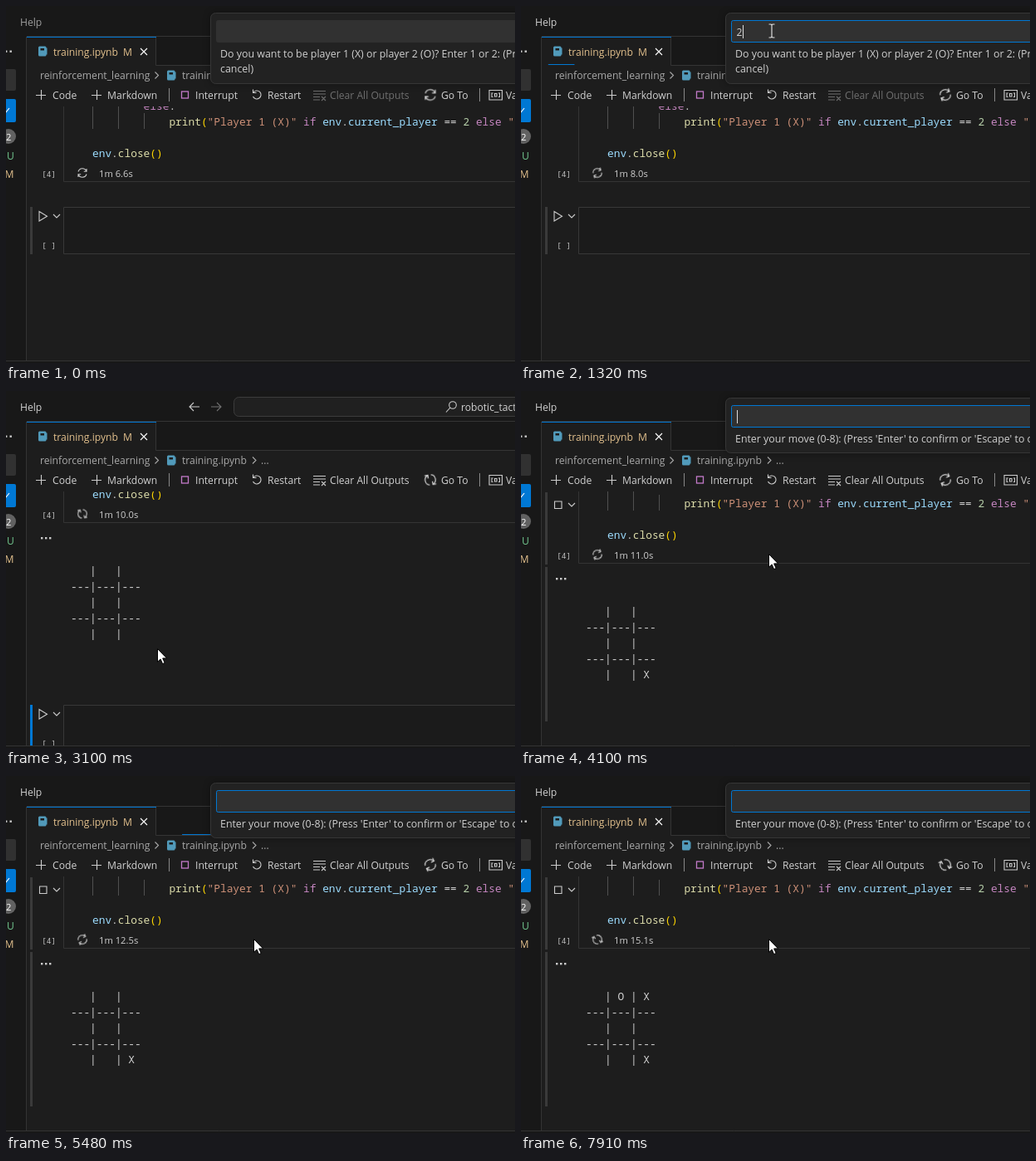
Animation of 613 by 430 pixels, one loop 7.99 s. Source, as an HTML page:

```html
<!DOCTYPE html>
<html lang="en">
<head>
<meta charset="utf-8">
<title>Notebook game</title>
<style>
  html, body { margin: 0; width: 100%; height: 100%; overflow: hidden; background: #1d1d1d; }
  svg { display: block; }
  text { font: 12.15px "Open Sans", "Noto Sans", sans-serif; fill: #d0d0d0; white-space: pre; }
  .mono { font: 12.83px "Noto Sans Mono", monospace; fill: #d4d4d4; }
  .tiny { font: 9.6px "Noto Sans Mono", monospace; fill: #bbb; }
  .time { font-size: 11.2px; }
  .ask { font-size: 12.4px; }
  .crumb { fill: #a9a9a9; }
  .mod { fill: #e2c08d; }
  .line { fill: none; stroke: #ccc; stroke-width: 1.1; }
  .edge { fill: none; stroke: #343434; }
  .guide { fill: none; stroke: #505050; }
  .fn { fill: #dcdcaa; } .par { fill: #ffd700; } .str { fill: #ce9178; }
  .key { fill: #c586c0; } .var { fill: #9cdcfe; } .num { fill: #b5cea8; }
  #prompt { filter: drop-shadow(0 0 4px rgba(0, 0, 0, .36)); }

  .spin { animation: spin 7990ms linear infinite; }
  @keyframes spin { to { transform: rotate(2062deg); } }

  #progress { transform-box: fill-box; transform-origin: center; animation: progress 7990ms linear infinite; }
  @keyframes progress {
    0%, 16.28% { transform: translateX(1519px); }
    16.29% { transform: none; }
    39.52% { transform: translateX(775px) scaleX(3); }
    62.75% { transform: translateX(1519px); }
    62.76% { transform: none; }
    85.98%, 100% { transform: translateX(775px) scaleX(3); }
  }

  #mouse { animation: mouse 7990ms linear infinite; }
  @keyframes mouse {
    0%, 4.38% { transform: translate(556px, 431px); }
    9.4%, 21.3% { transform: translate(302px, 30px); animation-timing-function: ease-in-out; }
    27.5% { transform: translate(212px, 340px); animation-timing-function: ease-in-out; }
    32.5%, 42.6% { transform: translate(182px, 310px); animation-timing-function: ease-in-out; }
    47.6%, 100% { transform: translate(298px, 196px); }
  }
</style>
</head>
<body>
<svg id="stage" width="613" height="430" viewBox="0 0 613 430"></svg>
<script>
const LOOP = 7990;
const BLINK = 0.465;
// Moments in seconds
const FOCUS = 0.78, TYPE_SIDE = 1.1, SEND_SIDE = 1.6, OUTPUT = 2, BOARD = 2.5;
const CLICK = 3.35, FIRST_X = 3.7, ASK_MOVE = 3.75, TYPE_MOVE = 6, SEND_MOVE = 7.1;

// y is the vertical middle of the line of text
const text = (x, y, s, cls = '', extra = '') =>
  `<text x="${x}" y="${y + 4.5}" class="${cls}" ${extra}>${s}</text>`;
const span = (cls, s) => `<tspan class="${cls}">${s}</tspan>`;
const rect = (x, y, w, h, fill, extra = '') =>
  `<rect x="${x}" y="${y}" width="${w}" height="${h}" fill="${fill}" ${extra}/>`;
const line = (d, extra = '') => `<path class="line" d="${d}" ${extra}/>`;
const edge = (d, cls = 'edge') => `<path class="${cls}" d="${d}"/>`;
const at = (x, y, body) => `<g transform="translate(${x} ${y})">${body}</g>`;

const plus = x => line(`M${x - 6} 107.5H${x + 6}M${x + 0.5} 101V113`);
const chevron = (x, y) => line(`M${x - 2} ${y - 4}l4 4-4 4`, 'style="stroke:#a9a9a9"');
const fold = (x, y) => line(`M${x - 4} ${y - 2}l4 4 4-4`);
const dots = (x, y) => [0, 5, 10].map(d => rect(x + d, y, 2.4, 2.4, '#ccc')).join('');
const book = (x, y) => rect(x, y - 6, 9.5, 12, '#519aba', 'rx="1.5"') +
  rect(x + 2.5, y - 3.5, 4.5, 2.5, '#1d1d1d') + rect(x + 9, y - 4, 1.5, 8, '#519aba');
const sync = (x, y, scale) => at(x, y, `<g class="spin"><g transform="scale(${scale})">` +
  line('M-5-1.5A5.2 5.2 0 0 1 4.8-2M5-5V-1.8H1.8M5 1.5A5.2 5.2 0 0 1-4.8 2M-5 5V1.8H-1.8') + '</g></g>');

const titleBar = rect(0, 0, 613, 37, '#181818') +
  text(-2.5, 19, 'l') + text(17, 19, 'Help', '', 'id="help"') +
  `<g id="header">
    ${line('M233 19H221M226 14l-5 5 5 5')}
    <g opacity=".5">${line('M247 19H259M254 14l5 5-5 5')}</g>
    ${rect(274.5, 7.5, 400, 23, '#202020', 'rx="6" stroke="#3c3c3c"')}
    <circle class="line" cx="538" cy="17" r="4.3"/>${line('M535 20l-5 5.5')}
    ${text(548, 19, 'robotic_tactoe')}
  </g>`;

const sideBar = rect(0, 37, 25, 393, '#181818') + edge('M24.5 37V427') +
  rect(-1, 53.5, 2.4, 2.4, '#ccc') + rect(4.5, 53.5, 2.4, 2.4, '#ccc') +
  rect(-5, 76, 17, 26, '#313131', 'rx="2"') + rect(-5, 112, 17, 28, '#0078d4', 'rx="2"') +
  line('M-3 127l2 2 5-6', 'style="stroke:#fff"') +
  '<circle cx="3" cy="157" r="9" fill="#616161"/>' + text(0, 157, '2', 'time', 'style="fill:#fff"') +
  text(1, 180, 'U', '', 'style="fill:#73c991"') + text(-1.5, 202, 'M', 'mod');

const tabs = rect(25, 37, 588, 34, '#181818') + rect(25, 37, 156, 35, '#1d1d1d') +
  edge('M25 36.5H613M180.5 37V71.5H613') + rect(25, 37, 156, 1, '#0078d4') +
  book(39, 54.5) + text(57, 55, 'training.ipynb', 'mod') + text(141, 55, 'M', 'mod') +
  line('M162 51l8 8M170 51l-8 8', 'style="stroke:#fff"') +
  text(41, 83.5, 'reinforcement_learning', 'crumb') + chevron(181.5, 83.5) + book(194, 83.5) +
  text(212, 83.5, 'training.ipynb', 'crumb') + chevron(299, 83.5) + text(307, 83.5, '...', 'crumb');

const toolBar = plus(42) + text(56, 107, 'Code') + plus(109) + text(122, 107, 'Markdown') +
  rect(196, 99, 1, 16, '#888') +
  '<rect x="211.5" y="103" width="8" height="8" fill="none" stroke="#c37ac9" stroke-width="1.3"/>' +
  text(228, 107, 'Interrupt') +
  line('M298 104A5 5 0 1 1 297.5 109M297.5 100.5V104.5H301.5') + text(315, 107, 'Restart') +
  `<g id="clear">${line('M370 102.5H385M370 106H385M370 109.5H378M370 113H378M380 109l5 5M385 109l-5 5')}
  ${text(390, 107, 'Clear All Outputs')}</g>` +
  sync(511, 107, 1.2) + text(524, 107, 'Go To') + rect(570, 99, 1, 16, '#888') +
  line('M582 101.5H597.5V113H582Z') + line('M586.5 105H585V109.5H586.5M593 105H594.5V109.5H593M588.5 105.5v3.5h2.5v-3.5z') +
  text(602, 107, 'Variables');

const printLine = span('fn', 'print') + span('par', '(') + span('str', '"Player 1 (X)"') +
  span('key', ' if ') + span('var', 'env') + '.' + span('var', 'current_player') + ' == ' +
  span('num', '2') + span('key', ' else ') + span('str', '"');
const closeLine = span('var', 'env') + '.' + span('fn', 'close') + span('par', '()');

const codeCell = `<g id="cell">
  ${edge('M69.5-80V34.5H613')}
  ${edge('M104.5-80V-29M135.5-80V-29M166.5-48V-29', 'guide')}
  ${text(165.6, -57, span('key', 'else') + ':', 'mono')}
  ${text(196.4, -38, printLine, 'mono')}
  ${text(104, 0, closeLine, 'mono')}
  ${text(43, 24, '[4]', 'tiny')} ${sync(92, 24, 1)}
  ${text(112, 24.5, '', 'time', 'id="time"')}
  <g id="cellBars">${rect(29, -51, 3, 87, 'inherit')}${rect(29, 39, 3, 186, 'inherit')}</g>
  <g id="more">${dots(42, 52)}</g>
  <g id="board">${[0, 1, 2, 3, 4].map(i => text(78, 92.5 + i * 19, '', 'mono')).join('')}</g>
</g>`;

const emptyCell = `<g id="nextCell">
  <path d="M613 .5H69.5V56.5H613" fill="#1b1b1b" stroke="#383838"/>
  ${rect(29, 0, 3, 57, 'inherit', 'id="nextBar"')}
  ${line('M40 5.5V17L49.5 11.2Z')} ${fold(61, 11)} ${text(43, 45.5, '[ ]', 'tiny')}
</g>`;

const prompt = `<g id="prompt">
  ${rect(246.5, 8.5, 420, 85, '#222', 'id="promptBox" rx="6" stroke="#363636"')}
  ${rect(253.5, 17.5, 420, 26, '#313131', 'id="field" rx="2"')}
  ${text(259.5, 31, '', '', 'id="typed"')} ${rect(260, 23, 1, 16, '#ddd', 'id="caret"')}
  ${text(258, 57.5, '', 'ask', 'id="ask"')} ${text(258, 75, 'cancel)', 'ask', 'id="askMore"')}
</g>`;

const mouse = `<g id="mouse">
  <path id="arrow" d="M.5 .5V16.2L4.1 12.9 6.6 18.6 9.2 17.5 6.7 11.9H11.6Z" fill="#fff" stroke="#000"/>
  <path id="beam" d="M-3.5-8H-1L0-7 1-8H3.5M0-7V7M-3.5 8H-1L0 7 1 8H3.5" fill="none" stroke="#ddd" stroke-width="1.2"/>
</g>`;

document.getElementById('stage').innerHTML =
  '<clipPath id="view"><path d="M25 121H613V427H25Z"/></clipPath>' +
  rect(0, 0, 613, 430, '#1d1d1d') + titleBar + sideBar + tabs + toolBar +
  `<g clip-path="url(#view)">${codeCell}${emptyCell}
    <g id="stop">${line('M40.5 133H49V141.5H40.5Z')}${fold(61, 137)}</g></g>` +
  rect(0, 427, 613, 3, '#181818') + edge('M0 427.5H613') +
  rect(25, 70, 31, 1, '#0078d4', 'id="progress"') + prompt + mouse;

const el = Object.fromEntries([...document.querySelectorAll('[id]')].map(e => [e.id, e]));
const rows = [...el.board.children];
const show = (e, on) => { e.style.display = on ? '' : 'none'; };
const moveTo = (e, y) => e.setAttribute('transform', `translate(0 ${y})`);
const within = (t, from, to) => t >= from && t < to;

function codeY(t) {
  if (t < BOARD) return 177;
  const p = Math.min(1, Math.max(0, (t - CLICK) / 0.12));
  return 124 + 49 * (1 - (1 - p) ** 2);
}

function boardRows(t) {
  const top = t >= SEND_MOVE ? '   | O | X' : '   |   |';
  const bottom = t >= FIRST_X ? '   |   | X' : '   |   |';
  return [top, '---|---|---', '   |   |', '---|---|---', bottom];
}

function drawPrompt(t) {
  const side = t < SEND_SIDE, open = side || t >= ASK_MOVE;
  show(el.prompt, open);
  show(el.header, !open);
  show(el.askMore, side);
  el.promptBox.setAttribute('height', side ? 85 : 66);
  el.ask.textContent = side
    ? "Do you want to be player 1 (X) or player 2 (O)? Enter 1 or 2: (Press 'Enter'"
    : "Enter your move (0-8): (Press 'Enter' to confirm or 'Escape' to cancel)";
  el.field.setAttribute('stroke', t >= FOCUS ? '#0078d4' : '#313131');

  const typed = within(t, TYPE_SIDE, SEND_SIDE) ? '2' : within(t, TYPE_MOVE, SEND_MOVE) ? '1' : '';
  el.typed.textContent = typed;
  const since = [FOCUS, TYPE_SIDE, ASK_MOVE, TYPE_MOVE, SEND_MOVE].filter(s => s <= t).pop();
  show(el.caret, t >= FOCUS && Math.floor((t - since) / BLINK) % 2 === 0);
  el.caret.setAttribute('x', typed ? 267 : 260);
}

function draw(t) {
  const y = codeY(t);
  const output = t < OUTPUT ? 0 : t < BOARD ? 37 : 189;
  moveTo(el.cell, y);
  moveTo(el.nextCell, y + 65 + output);
  el.time.textContent = `1m ${(Math.floor((6.68 + t * 1.075) * 10) / 10).toFixed(1)}s`;
  el.help.style.fill = t < FOCUS ? '#9d9d9d' : '#d0d0d0';
  el.clear.style.opacity = t < OUTPUT ? 0.45 : 1;

  show(el.more, t >= OUTPUT);
  show(el.board, t >= BOARD);
  boardRows(t).forEach((s, i) => { rows[i].textContent = s; });

  show(el.cellBars, t >= CLICK);
  show(el.stop, t >= CLICK);
  for (const bar of el.cellBars.children) bar.style.fill = t < ASK_MOVE ? '#0078d4' : '#3a3a3a';
  show(el.nextBar, t < CLICK);
  el.nextBar.style.fill = t < SEND_SIDE ? '#3a3a3a' : '#0078d4';

  const overField = within(t, 0.73, 1.72);
  show(el.beam, overField);
  show(el.arrow, t > 0.35 && !overField);
  drawPrompt(t);
}

let start;
function tick(now) {
  start ??= now;
  draw(((now - start) % LOOP) / 1000);
  requestAnimationFrame(tick);
}
draw(0);
requestAnimationFrame(tick);
</script>
</body>
</html>
```
